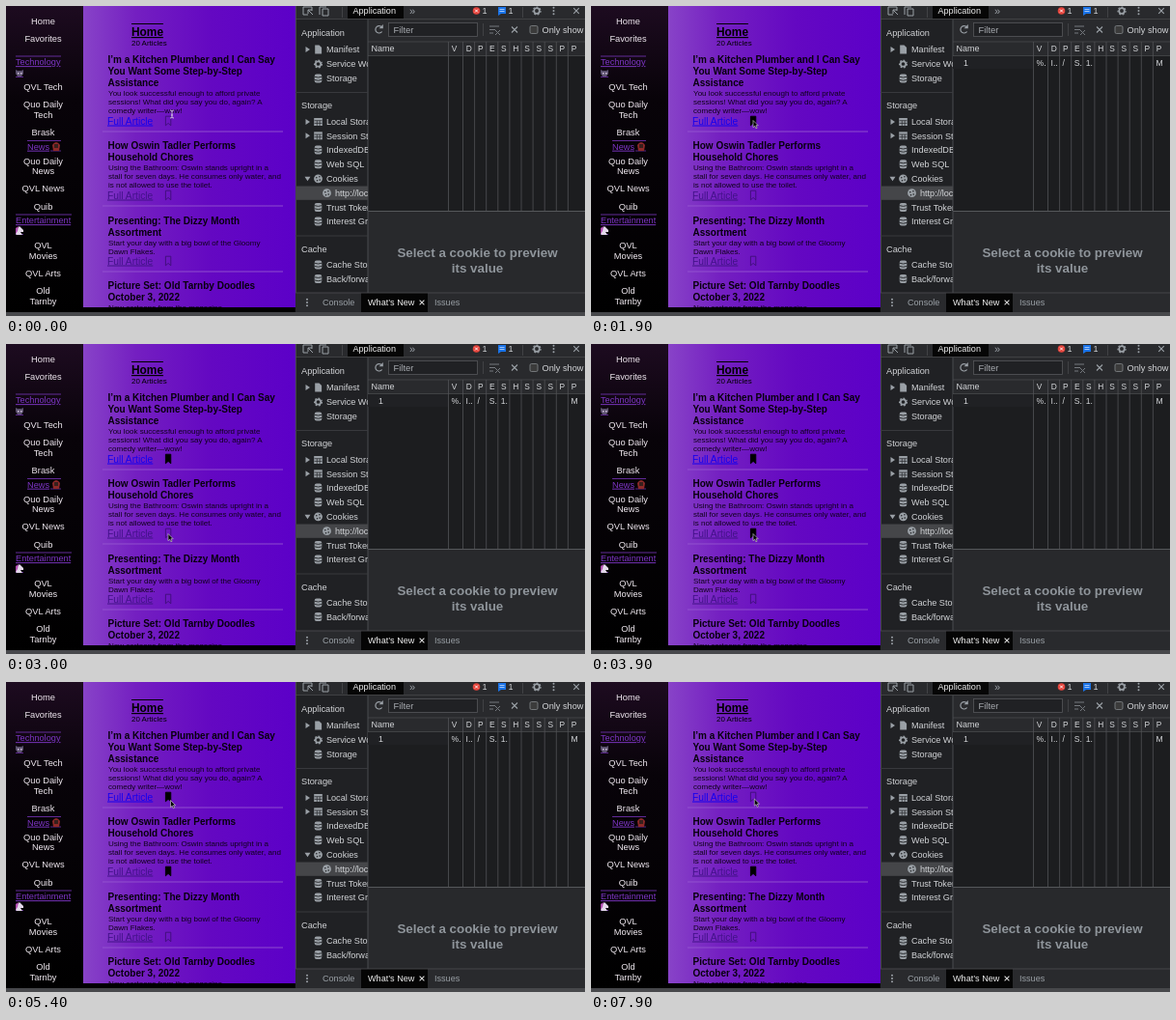
An HTML page that plays this animation: 600x321 px, repeating every 8000 ms.

```html
<!DOCTYPE html>
<html lang="en">
<head>
<meta charset="utf-8">
<title>Bookmarks and cookies</title>
<style>
html, body { margin: 0; width: 100%; height: 100%; overflow: hidden; background: #000; }
svg { display: block; width: 100vw; height: 100vh; font-family: "Liberation Sans", Arial, sans-serif; }
</style>
</head>
<body>
<svg id="stage" viewBox="0 0 600 321" preserveAspectRatio="none">
  <defs>
    <linearGradient id="purple">
      <stop offset="0" stop-color="#8843c8"/>
      <stop offset=".25" stop-color="#741fc1"/>
      <stop offset=".6" stop-color="#6408c2"/>
      <stop offset="1" stop-color="#5c00c8"/>
    </linearGradient>
    <linearGradient id="night" x2="0" y2="1">
      <stop offset="0" stop-color="#1d0b20"/>
      <stop offset=".3" stop-color="#080309"/>
      <stop offset="1" stop-color="#000"/>
    </linearGradient>
    <clipPath id="pageClip"><rect x="80" width="220" height="312"/></clipPath>
    <clipPath id="treeClip"><rect x="300" width="75" height="297"/></clipPath>
  </defs>
  <g id="page" clip-path="url(#pageClip)"></g>
  <g id="nav"></g>
  <g id="tools"></g>
  <g id="tree" clip-path="url(#treeClip)"></g>
  <g id="cookieRow"></g>
  <g id="pointer">
    <circle id="ring" cx="1" cy="1.5" r="8.5" fill="#301050" fill-opacity=".22" stroke="#493064" stroke-width="1"/>
    <path id="arrow" d="M0 0V7.2L1.7 5.7 2.9 8.3 4.1 7.8 2.9 5.2H5.2Z" fill="#000" stroke="#ddd" stroke-width=".6"/>
    <path id="beam" d="M-2-4Q0-4 0-3Q0-4 2-4M0-3V3M-2 4Q0 4 0 3Q0 4 2 4M-1 1H1" fill="none" stroke="#d8d0e0" stroke-width=".9"/>
  </g>
</svg>
<script>
const NS = 'http://www.w3.org/2000/svg';
const $ = id => document.getElementById(id);

function add(parent, tag, attrs, content) {
  const node = document.createElementNS(NS, tag);
  for (const key in attrs) node.setAttribute(key, attrs[key]);
  if (content !== undefined) node.textContent = content;
  parent.appendChild(node);
  return node;
}
const text = (parent, x, y, size, fill, content, more = {}) =>
  add(parent, 'text', { x, y, 'font-size': size, fill, ...more }, content);
const rect = (parent, x, y, width, height, fill, more = {}) =>
  add(parent, 'rect', { x, y, width, height, fill, ...more });
const stroke = (parent, d, color, width = 1) =>
  add(parent, 'path', { d, fill: 'none', stroke: color, 'stroke-width': width });
const shape = (parent, d, fill) => add(parent, 'path', { d, fill });
const bold = { 'font-weight': 700 };
const underline = { 'text-decoration': 'underline' };
const middle = { 'text-anchor': 'middle' };

// Article list
const page = $('page');
rect(page, 80, 0, 220, 321, 'url(#purple)');
stroke(page, 'M130 18.5H163', '#000', 1.2);
text(page, 130, 31, 11.9, '#000', 'Home', { ...bold, ...underline });
text(page, 130, 41, 7.95, '#000', '20 Articles');

const articles = [
  { top: 59, link: 122.5, rule: 130, color: '#1600ee',
    title: ['I’m a Kitchen Plumber and I Can Say', 'You Want Some Step-by-Step', 'Assistance'],
    body: ['You look successful enough to afford private', 'sessions! What did you say you do, again? A', 'comedy writer—wow!'] },
  { top: 148, link: 199.5, rule: 207, color: '#43128a',
    title: ['How Oswin Tadler Performs', 'Household Chores'],
    body: ['Using the Bathroom: Oswin stands upright in a', 'stall for seven days. He consumes only water, and', 'is not allowed to use the toilet.'] },
  { top: 226, link: 267.5, rule: 275, color: '#43128a',
    title: ['Presenting: The Dizzy Month', 'Assortment'],
    body: ['Start your day with a big bowl of the Gloomy', 'Dawn Flakes.'] },
  { top: 293, title: ['Picture Set: Old Tarnby Doodles', 'October 3, 2022'],
    body: ['New cartoons from the magazine.'] }
];
const marks = [];
for (const { top, link, rule, color, title, body } of articles) {
  title.forEach((line, i) => text(page, 105.5, top + 12 * i, 10, '#08000e', line, bold));
  const bodyTop = top + 12 * title.length - 2.2;
  body.forEach((line, i) => text(page, 106, bodyTop + 8.9 * i, 8.05, '#10021c', line));
  if (!link) continue;
  text(page, 105, link, 10.25, color, 'Full Article', underline);
  const y = link - 8.3;
  marks.push(add(page, 'path', { d: `M165.4 ${y}H170.8V${y + 9.6}L168.1 ${y + 7.2}L165.4 ${y + 9.6}Z`, 'stroke-width': .9 }));
  stroke(page, `M100 ${rule}H287`, '#9456d0', .9);
}

// Feed navigation
const nav = $('nav');
rect(nav, 0, 0, 80, 318, 'url(#night)');
const feeds = [
  ['Home', 16], ['Favorites', 34], ['QVL Tech', 84], ['Quo Daily', 101.5], ['Tech', 112.5],
  ['Brask', 131], ['Quo Daily', 160.5], ['News', 171], ['QVL News', 189], ['Quib', 207.5],
  ['QVL', 247.5], ['Movies', 258.5], ['QVL Arts', 276.5], ['Old', 295], ['Tarnby', 305.5]
];
for (const [name, y] of feeds) text(nav, 38.5, y + 3.3, 9.3, '#f0e9f0', name, middle);
for (const [name, x, y, end] of [['Technology', 10, 58, 57], ['News', 22, 145.5, 57], ['Entertainment', 10, 222, 68]]) {
  text(nav, x, y + 3.2, 9.2, '#7d35c4', name, underline);
  stroke(nav, `M${x} ${y - 6}H${end}`, '#6b2fa8', .9);
}
stroke(nav, 'M46 150H57M10 73.5H18M10 236.5H18', '#6b2fa8', .8);
// Small pictograms beside the headings
shape(nav, 'M10 66L12 67H16L18 66V70L16 73H12L10 70Z', '#5d5370');
shape(nav, 'M12 69H13.5V70.5H12ZM15 69H16.5V70.5H15Z', '#d5c7df');
shape(nav, 'M48 144Q52 138 56 144L55 150H49Z', '#8c2929');
shape(nav, 'M50 143H54V147H50Z', '#38201d');
shape(nav, 'M10 236L11 231 14 228 18 232V234H15L17 237H11Z', '#e4d9eb');
shape(nav, 'M10 236L10 230 13 228 12 233Z', '#b24fb1');

// Developer tools
const tools = $('tools');
const ink = '#d3d5d8', soft = '#9aa0a6', edge = '#48494c', bar = '#292a2d';
rect(tools, 300, 0, 300, 318, '#202124');
rect(tools, 300, 0, 300, 13, bar);
rect(tools, 354, 0, 58, 13, '#060606');
stroke(tools, 'M300 13.5H600M348.5 1V12M535.5 1V12', edge, .8);
stroke(tools, 'M313 9H308V1H317V5M313 4L318 9M313 8V4H317', soft, 1);
stroke(tools, 'M325 9V1H332M328 3H334V10H328Z', soft, 1);
text(tools, 359.5, 8.4, 9.1, '#f0f0f0', 'Application');
text(tools, 418, 8.5, 11, soft, '»');
add(tools, 'circle', { cx: 487.5, cy: 5, r: 3.8, fill: '#e5443c' });
stroke(tools, 'M486 3.5L489 6.5M489 3.5L486 6.5', '#fff', .9);
text(tools, 493.5, 8.2, 9, ink, '1');
shape(tools, 'M510 1H518V8H513L510 10Z', '#1a73e8');
stroke(tools, 'M511.5 3.5H516.5M511.5 5.5H516.5', '#dbe8fc', .7);
text(tools, 520.5, 8.2, 9, ink, '1');

function gear(parent, x, y, r) {
  add(parent, 'circle', { cx: x, cy: y, r, fill: 'none', stroke: soft, 'stroke-width': 1.7 });
  add(parent, 'circle', { cx: x, cy: y, r: r + 1.2, fill: 'none', stroke: soft, 'stroke-width': 1.2, 'stroke-dasharray': '1.7 1.9' });
}
function dots(x, y) {
  for (const dy of [-3.2, 0, 3.2]) add(tools, 'circle', { cx: x, cy: y + dy, r: 1, fill: soft });
}
const cross = (x, y, r, color) =>
  stroke(tools, `M${x - r} ${y - r}L${x + r} ${y + r}M${x + r} ${y - r}L${x - r} ${y + r}`, color, 1.1);
gear(tools, 550, 5, 2.8);
dots(567.5, 5);
cross(591, 5, 2.8, soft);

// Filter bar and cookie table
rect(tools, 375, 14, 225, 23, bar);
stroke(tools, 'M389.5 22A3.7 3.7 0 1 0 389.6 26.5', soft, 1.2);
shape(tools, 'M390.8 19V23.2H386.6Z', soft);
rect(tools, 396.5, 17.5, 92, 14, '#202124', { stroke: '#55565a', 'stroke-width': .8 });
text(tools, 401.5, 27.8, 9.4, '#a7abb0', 'Filter');
stroke(tools, 'M501 21H511M501 24.5H507M501 28H505M507 25L512 30M512 25L507 30', '#75797e', 1);
cross(527, 24.5, 3, soft);
stroke(tools, 'M494.5 18V31', edge, .8);
rect(tools, 543, 20.5, 8, 8, '#3b3b3b', { rx: 1.5, stroke: '#85888c', 'stroke-width': .8 });
text(tools, 555.5, 27.8, 9.2, ink, 'Only show an issue');

rect(tools, 375, 37, 225, 14.5, bar);
rect(tools, 375, 52, 225, 160, '#1c1d1f');
stroke(tools, 'M375 37H600M375 51.5H600', edge, .8);
const columnX = i => i ? 473.5 + 12.1 * (i - 1) : 458.5;
text(tools, 378.5, 47.4, 9, ink, 'Name');
[...'VDPESHSSSPP'].forEach((letter, i) => {
  const x = columnX(i);
  stroke(tools, `M${x} 37V212`, '#515256', .8);
  text(tools, x + 3.3, 47.2, 8.4, ink, letter);
});
rect(tools, 375, 212, 225, 85, '#28292c');
stroke(tools, 'M375 212.5H600', '#55575a', 1);
text(tools, 488.5, 259.5, 13.35, '#8f959b', 'Select a cookie to preview', { ...bold, ...middle });
text(tools, 488.5, 275.5, 13.35, '#8f959b', 'its value', { ...bold, ...middle });

const row = $('cookieRow');
rect(row, 375, 52, 83, 13, '#202124');
text(row, 386, 62, 8.8, ink, '1');
['%.', 'I..', '/', '', 'S.', '1.', '', '', '', '', 'M'].forEach((cell, i) => {
  const shift = i > 3 && i < 6 ? -1 : 0;
  text(row, columnX(i + shift) + 3, 62, 8.6, ink, cell);
});

// Storage tree
const tree = $('tree');
const icons = {
  file: (x, y) => shape(tree, `M${x - 3.3} ${y - 4.5}H${x + 1}L${x + 3.6} ${y - 2}V${y + 4.5}H${x - 3.3}Z`, soft),
  gear: (x, y) => gear(tree, x, y, 2.7),
  base: (x, y) => {
    rect(tree, x - 3.8, y - 4.5, 7.6, 9, soft, { rx: 2.2 });
    stroke(tree, `M${x - 4} ${y - 1.8}Q${x} ${y - .2} ${x + 4} ${y - 1.8}M${x - 4} ${y + 1.4}Q${x} ${y + 3} ${x + 4} ${y + 1.4}`, '#202124', .9);
  },
  grid: (x, y) => {
    rect(tree, x - 4.3, y - 4, 8.6, 8, soft);
    stroke(tree, `M${x - 4} ${y - 1.3}H${x + 4}M${x - 4} ${y + 1.4}H${x + 4}M${x - 1.2} ${y - 1.3}V${y + 4}M${x + 1.6} ${y - 1.3}V${y + 4}`, '#202124', .7);
  },
  cookie: (x, y) => {
    add(tree, 'circle', { cx: x, cy: y, r: 4.4, fill: soft });
    for (const [dx, dy] of [[-1.7, -1], [1.4, -2], [1.7, 1.3], [-1, 2]])
      add(tree, 'circle', { cx: x + dx, cy: y + dy, r: .8, fill: '#202124' });
  }
};
rect(tree, 300, 186.5, 75, 14.3, '#454649');
for (const [name, y] of [['Application', 28], ['Storage', 103], ['Cache', 252]]) text(tree, 306, y + 3.3, 9.2, ink, name);
const entries = [
  ['Manifest', 45, 'file', 'closed'], ['Service Workers', 60, 'gear'], ['Storage', 75, 'base'],
  ['Local Storage', 120, 'grid', 'closed'], ['Session Storage', 134.3, 'grid', 'closed'],
  ['IndexedDB', 149, 'base'], ['Web SQL', 163.8, 'base'], ['Cookies', 178.8, 'cookie', 'open'],
  ['http://localhost', 193.7, 'cookie'], ['Trust Tokens', 208.4, 'base'], ['Interest Groups', 223, 'base'],
  ['Cache Storage', 268, 'base'], ['Back/forward cache', 282.5, 'base']
];
for (const [name, y, icon, toggle] of entries) {
  const indent = name.startsWith('http') ? 9 : 0;
  icons[icon](323.5 + indent, y);
  text(tree, 332 + indent, y + 3.2, 9.1, ink, name);
  if (toggle) shape(tree, toggle === 'open' ? `M309.5 ${y - 2}H315.5L312.5 ${y + 2.5}Z` : `M310.5 ${y - 3}V${y + 3}L315 ${y}Z`, soft);
}
stroke(tree, 'M300 89.5H375M300 238H375', '#3c3d40', .9);
stroke(tools, 'M375 14V297M300.4 0V318', '#505256', .9);

// Drawer
rect(tools, 300, 297, 300, 20, bar);
rect(tools, 368, 297, 69, 20, '#050505');
stroke(tools, 'M300 297H600', edge, .9);
dots(312, 307);
text(tools, 328, 310.3, 9.1, soft, 'Console');
text(tools, 375, 310.3, 9.1, '#f0f0f0', 'What’s New');
cross(431, 307, 2.4, '#d8d8d8');
text(tools, 444, 310.3, 9.1, soft, 'Issues');
rect(tools, 0, 317, 600, 4, '#47484b');
rect(page, 80, 312, 220, 5, '#5c00c8');

// Motion: [time, x, y]
const LOOP = 8000;
const path = [
  [0, 172, 112], [200, 172, 112], [600, 168, 118.5], [2000, 168, 118.5], [2700, 168, 196.5],
  [4200, 168, 196.5], [5000, 170.5, 122.5], [5600, 170.5, 122.5], [6300, 168.8, 120.5],
  [7200, 168.8, 120.5], [7600, 169.3, 121], [LOOP, 169.3, 121]
];
const clicks = [1100, 3200, 6800];
const saved = [t => t >= 1200 && t < 7000, t => t >= 3300, () => false];

function pointerAt(t) {
  const i = path.findIndex(([time]) => time > t);
  const [t0, x0, y0] = path[i - 1], [t1, x1, y1] = path[i];
  const u = (t - t0) / (t1 - t0), k = u * u * (3 - 2 * u);
  return [x0 + (x1 - x0) * k, y0 + (y1 - y0) * k];
}
const show = (id, on) => $(id).setAttribute('visibility', on ? 'visible' : 'hidden');

function render(t) {
  marks.forEach((mark, i) => {
    const on = saved[i](t);
    mark.setAttribute('fill', on ? '#000' : 'none');
    mark.setAttribute('stroke', on ? '#000' : '#3e0f78');
  });
  $('pointer').setAttribute('transform', `translate(${pointerAt(t)})`);
  show('beam', t < 400);
  show('arrow', t >= 400);
  show('ring', clicks.some(start => t >= start && t < start + 300));
  show('cookieRow', t >= 1400);
}

const start = performance.now();
function frame() {
  const t = (performance.now() - start) % LOOP;
  render(Math.floor(t / 100) * 100);
  requestAnimationFrame(frame);
}
render(0);
requestAnimationFrame(frame);
</script>
</body>
</html>
```
